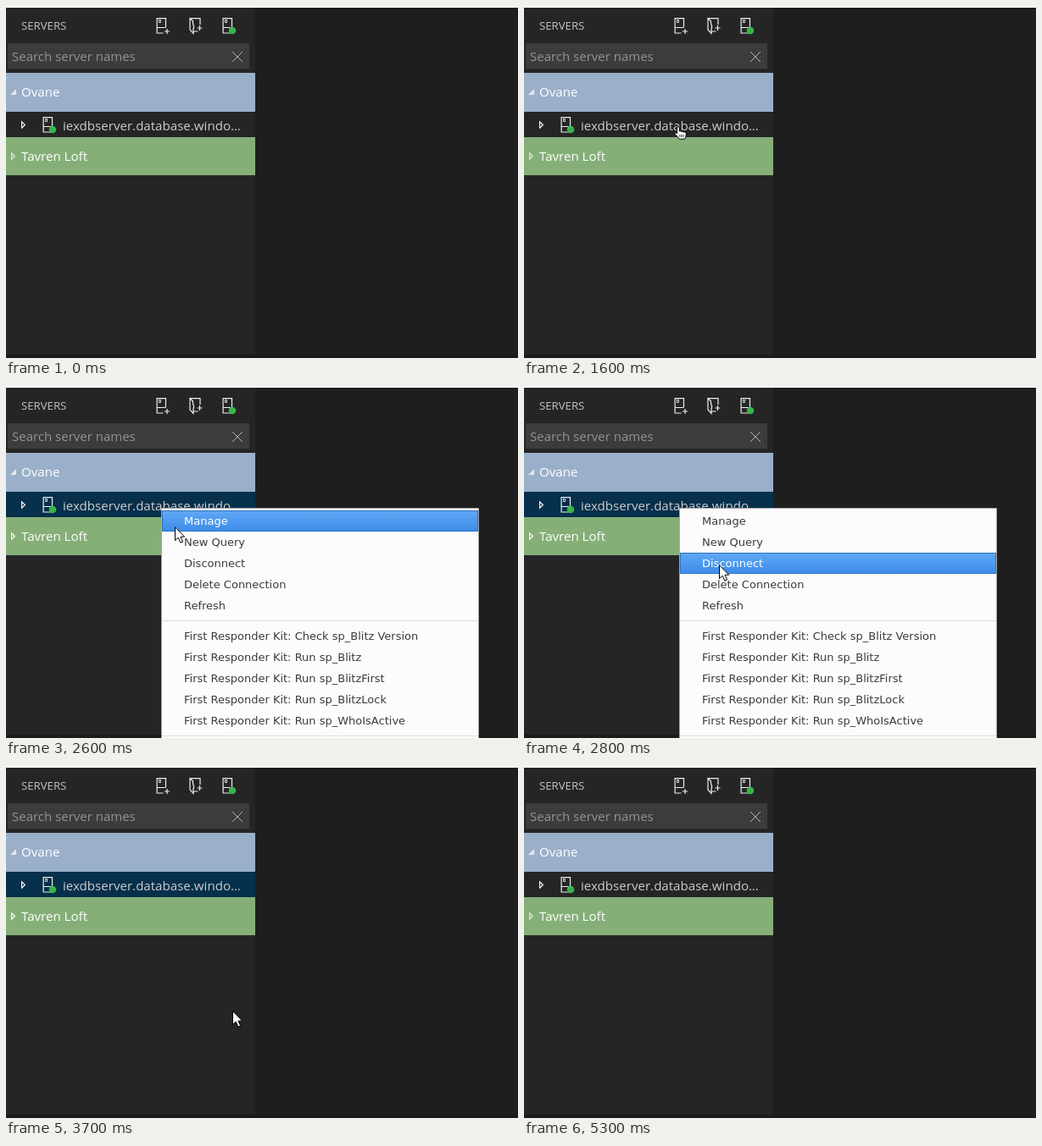
Recreate the animation shown at these times as an HTML page. Size 604 by 416 pixels, loop 5500 ms.

```html
<!DOCTYPE html>
<html lang="en">
<head>
<meta charset="utf-8">
<title>Server list</title>
<style>
  html, body { margin: 0; width: 100%; height: 100%; overflow: hidden; background: #1e1e1e; }
  svg { display: block; }
  text { font: 15.1px "Open Sans", "Noto Sans", sans-serif; white-space: pre; }
  #menu text { font: 13px "DejaVu Sans", sans-serif; fill: #3b3b3b; }
  #menu text.on { fill: #fff; }
  .line { fill: none; stroke: #eee; }
</style>
</head>
<body>
<svg width="604" height="416" viewBox="0 0 604 416">
  <defs>
    <linearGradient id="blue" x2="0" y2="1">
      <stop stop-color="#60a8f6"/><stop offset="1" stop-color="#3c8ce9"/>
    </linearGradient>
    <g id="server">
      <path class="line" stroke-width="1.2" d="M11 11V.6H.6V18H8M.6 11.5H11"/>
      <path class="line" stroke-width=".9" d="M3 2.5h2v3h-2z"/>
    </g>
    <g id="online">
      <use href="#server"/>
      <path class="line" stroke-width="1.2" d="M11 11V18H8"/>
      <circle cx="11.5" cy="15" r="4.3" fill="#36b64a"/>
    </g>
    <path id="plus" class="line" stroke-width="1.2" d="M-3 0H3M0-3V3"/>
    <path id="closed" d="M.6.8V8.2L4.4 4.5Z" fill="none" stroke-width="1.1"/>
  </defs>

  <path fill="#252526" d="M0 0H294V412H0z"/>
  <path fill="#1b1b1b" d="M0 412H604V416H0z"/>
  <path fill="#fff" d="M0 0H604V2H0z"/>

  <text x="18" y="28" fill="#c4c4c4" style="font-size:13.2px">SERVERS</text>
  <use href="#server" x="177.5" y="14"/>
  <use href="#plus" x="190" y="30"/>
  <path class="line" stroke-width="1.2" d="M217 14.6H229V22M217 14.6V28L221 32.5V27Q222.500 24 220.500 21V18Z M221 30H226.500"/>
  <use href="#plus" x="228.500" y="26"/>
  <use href="#online" x="255.500" y="14"/>

  <path fill="#3c3c3c" d="M2 44H287V74H2z"/>
  <text x="7" y="65" fill="#939393" style="font-size:15px">Search server names</text>
  <path class="line" style="stroke:#b5b5b5" d="M267 54L279 66M279 54L267 66"/>

  <path fill="#9aafc9" d="M0 79H294V125H0z"/>
  <path fill="#e6e6e6" d="M12 98V105H5z"/>
  <text x="18" y="107" fill="#fff">Ovane</text>

  <path id="row" d="M0 125H294V155H0z"/>
  <use href="#closed" x="18" y="136" stroke="#fff"/>
  <use href="#online" x="43.500" y="131"/>
  <text x="67" y="147" fill="#ccc">iexdbserver.database.windo…</text>

  <path fill="#86af78" d="M0 155H294V200H0z"/>
  <use id="mark" href="#closed" x="6" y="173"/>
  <text x="18" y="183" fill="#fff">Tavren Loft</text>

  <g id="menu">
    <path fill="#fcfcfc" stroke="#a8a8a8" d="M183.500 144.500H557.500V420H183.500z"/>
    <path stroke="#dcdcdc" d="M184 277.500H557M184 413.500H557"/>
    <rect id="bar" x="184.500" width="372" height="24" fill="url(#blue)" stroke="#2c72c2"/>
  </g>

  <g id="cursor" stroke="#000" fill="#fff" stroke-linejoin="round">
    <path id="arrow" d="M.5.8V16.6L4.200 13.200L6.900 19.200L9.600 18L7 12.200H11.700Z"/>
    <g id="hand" transform="translate(-4 -1)">
      <path d="M5 .6Q6.500.6 6.500 2V6Q7.700 5.300 8.800 6.400Q10.200 5.700 11.200 6.900Q13.900 6.400 14.200 8.600V11Q14 13 12.800 15.200H6.200Q4.800 12.600 1 9.600Q.5 7.900 2.100 7.700L3.600 8.800V2Q3.600.6 5 .6Z"/>
      <path fill="none" stroke-width=".8" d="M6.900 10V13M9 10V13M11.100 10V13"/>
    </g>
  </g>
</svg>

<script>
const $ = id => document.getElementById(id);
const LOOP = 5500, STEP = 100;

const kit = 'First Responder Kit: ';
const items = ['Manage', 'New Query', 'Disconnect', 'Delete Connection', 'Refresh',
  ...['Check sp_Blitz Version', 'Run sp_Blitz', 'Run sp_BlitzFirst', 'Run sp_BlitzLock',
    'Run sp_WhoIsActive'].map(s => kit + s)
].map((label, i) => {
  const el = document.createElementNS('http://www.w3.org/2000/svg', 'text');
  const top = 147 + 25 * i + (i > 4 ? 11 : 0);
  el.textContent = label;
  el.setAttribute('x', 210);
  el.setAttribute('y', top + 17);
  $('menu').append(el);
  return { el, top };
});

// start time, steps, from x, y, to x, y, sideways bend
const moves = [
  [500, 6, 136.2, -18.8, 213, 160, 0],
  [1400, 3, 213, 160, 181, 143.5, 0],
  [2600, 6, 181, 143.5, 266, 279, 6.5],
  [3200, 2, 266, 279, 267, 289.5, 0],
  [4200, 3, 267, 289.5, 184, 27, 0],
  [4600, 3, 184, 27, 91, -13.5, 0]
];

function pointer(t) {
  const [start, n, x0, y0, x1, y1, bend] = moves.findLast(m => t >= m[0]) || moves[0];
  const u = Math.min(n, Math.floor((t - start) / STEP) + 1) / n;
  return [x0 + (x1 - x0) * u + bend * 4 * u * (1 - u), y0 + (y1 - y0) * u];
}

const show = (id, on) => $(id).setAttribute('visibility', on ? 'visible' : 'hidden');

function draw(t) {
  const [x, y] = pointer(t);
  const selected = t >= 2000 && t < 5300;
  const open = t >= 2000 && t < 3700;
  const visible = t >= 500 && t < 4800;
  const onTree = y >= 79 && y < 200;
  const onIcon = y >= 14 && y < 33 && x >= 176 && x < 194;
  const link = !open && (onTree || onIcon);

  $('row').setAttribute('fill', selected ? '#06304b' : '#252526');
  $('mark').setAttribute('stroke', selected ? '#fff' : '#e4ece1');

  $('menu').style.display = open ? '' : 'none';
  const hover = t >= 2600 && items.find(m => y >= m.top && y < m.top + 25);
  for (const m of items) m.el.setAttribute('class', m === hover ? 'on' : '');
  $('bar').style.display = hover ? '' : 'none';
  if (hover) $('bar').setAttribute('y', hover.top + 0.5);

  $('cursor').setAttribute('transform', `translate(${Math.round(x)} ${Math.round(y - 0.5)})`);
  show('arrow', visible && !link);
  show('hand', visible && link);
}

function tick() {
  draw(performance.now() % LOOP);
  requestAnimationFrame(tick);
}
tick();
</script>
</body>
</html>
```
